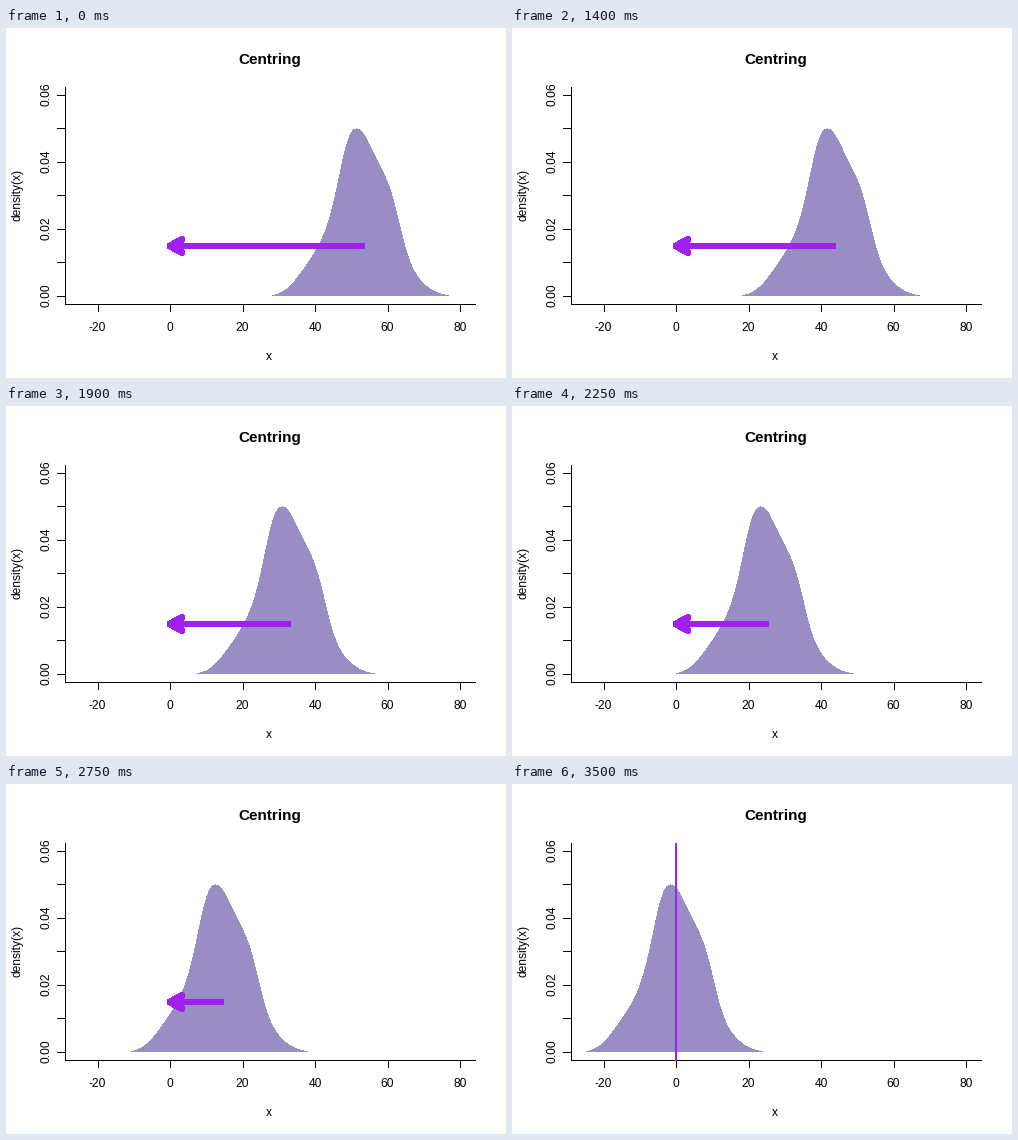
A matplotlib script that plays this animation: 500 px wide and 350 px high, repeating every 4.4 s.

```python
import numpy as np
import matplotlib.pyplot as plt
from matplotlib.animation import FuncAnimation
from matplotlib.patches import Rectangle

W, H, DPI = 500, 350, 100
PT = 72 / DPI                      # points per pixel
LEFT, RIGHT, TOP, BOTTOM = 59, 469, 59, 276
MEAN, MOVES = 53.0, 49
FIRST_MOVE, LINE_ON, FRAMES, STEP_MS = 20, 70, 88, 50
FILL, PURPLE = "#998ec3", "#a020f0"


def px(x):
    return 164.79 + 3.6219 * x


def py(y):
    return 268.5 - 3356.8 * y


def density(x, bandwidth=2.7, peak=0.0499):
    """Gaussian kernels on an even grid, scaled to the given peak."""
    weights = np.array([4.4, 17, 29, 47.7, 106, 101, 78, 68, 19, 8, 1.6])
    centres = np.linspace(-20, 20, len(weights))
    z = (x[:, None] - centres) / bandwidth
    total = np.exp(-z ** 2 / 2) @ weights
    return total / total.max() * peak


fig = plt.figure(figsize=(W / DPI, H / DPI), dpi=DPI, facecolor="white")
ax = fig.add_axes([0, 0, 1, 1])
ax.set_xlim(0, W)
ax.set_ylim(H, 0)
ax.axis("off")


def bar(x, y, w, h, color="black", z=2):
    patch = Rectangle((x, y), w, h, fc=color, lw=0, antialiased=False, zorder=z)
    return ax.add_patch(patch)


def label(x, y, text, size=12, angle=0, weight="normal"):
    ax.text(x, y, text, fontsize=size * PT, family="Liberation Sans",
            weight=weight, rotation=angle, rotation_mode="anchor",
            ha="center", va="baseline")


def stroke():
    line, = ax.plot([], [], color=PURPLE, lw=6 * PT, antialiased=False,
                    solid_capstyle="round", solid_joinstyle="round",
                    snap=False, zorder=4)
    return line


# Axes, ticks and labels
bar(LEFT, TOP, 1, BOTTOM - TOP + 1)
bar(LEFT, BOTTOM, RIGHT - LEFT + 1, 1)
for v in range(-20, 81, 20):
    bar(int(px(v)), BOTTOM, 1, 8)
    label(px(v) - 0.7, 303, str(v))
for k in range(7):
    y = py(k / 100)
    bar(LEFT - 8, int(y), 9, 1)
    if k % 2 == 0:
        label(43, y - 1.3, f"{k / 100:.2f}", angle=90)
label(263.3, 332, "x")
label(14, 167, "density(x)", angle=90)
label(263.4, 36, "Centring", size=15.2, weight="bold")

# Moving parts
xs = np.linspace(-25, 23.8, 240)
curve = np.column_stack([px(xs), np.minimum(py(density(xs)), 268)])
base = [[px(xs[-1]), 268], [px(xs[0]), 268]]
outline = np.vstack([curve, base])
shape, = ax.fill(*outline.T, fc=FILL, lw=0, antialiased=False, zorder=3)
shaft, head = stroke(), stroke()
tip_x, tip_y = int(px(0)), int(py(0.015))
head.set_data([tip_x + 12, tip_x, tip_x + 12],
              [tip_y - 6.5, tip_y, tip_y + 6.5])
centre = bar(int(px(0)) - 1, TOP, 2, BOTTOM - TOP + 1, PURPLE, 5)


def draw(i):
    move = min(max(i - FIRST_MOVE + 1, 0), MOVES)
    mean = MEAN * (1 - move / MOVES)
    shape.set_xy(outline + [px(mean) - px(0), 0])
    shaft.set_data([tip_x, int(px(mean))], [tip_y, tip_y])
    for part in (shaft, head):
        part.set_visible(move < MOVES)
    centre.set_visible(i >= LINE_ON)
    return shape, shaft, head, centre


anim = FuncAnimation(fig, draw, frames=FRAMES, interval=STEP_MS,
                     repeat=True, repeat_delay=0)
plt.show()
```
